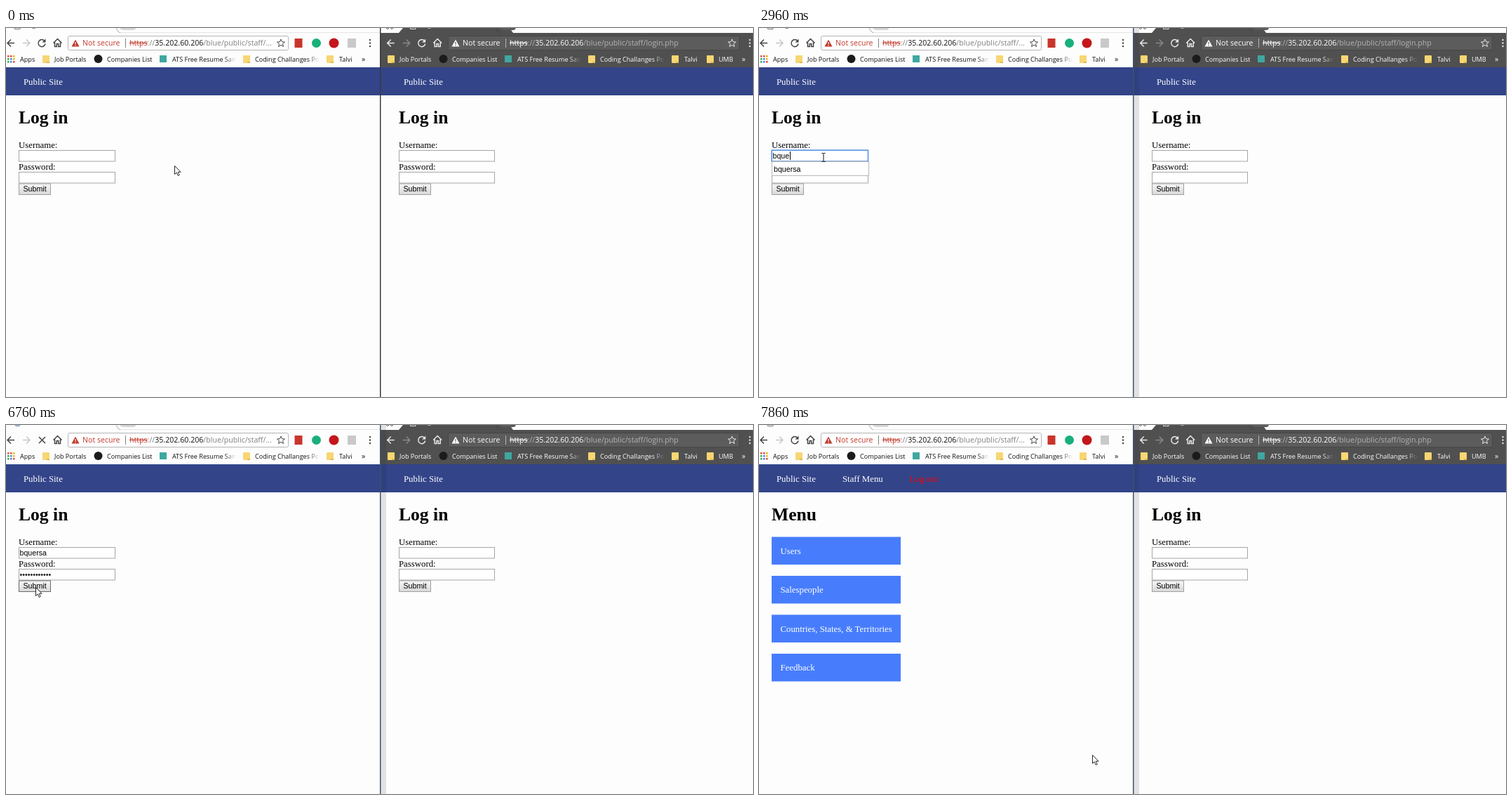
An HTML page for the animation above (8000 ms loop, 1065 px wide and 526 px high).

```html
<!DOCTYPE html>
<html lang="en">
<head>
<meta charset="utf-8">
<title>Log in</title>
<style>
html, body { margin: 0; width: 100%; height: 100%; overflow: hidden; background: #fdfdfd; }
svg { display: block; }
text { white-space: pre; }
.page { font: 12.8px "Liberation Serif", serif; }
.h1 { font: bold 25.6px "Liberation Serif", serif; }
.field { font: 10.67px "Liberation Sans", sans-serif; }
.mark { font: 9.1px "Open Sans", sans-serif; }
.url { font: 10.62px "Open Sans", sans-serif; }
.strike { text-decoration: line-through; }
.line { fill: none; stroke-width: 1.5; }
.thin { stroke-width: 1; }
</style>
</head>
<body>
<svg id="stage" width="1065" height="526" viewBox="0 0 1065 526"></svg>
<script>
const LOOP = 8000, USER = 'bquersa', BLUE = '#334489';
const light = {
  id: 'light', bar: '#fdfdfd', box: '#fff', edge: '#b4b4b4', ink: '#444', dim: '#c8c8c8',
  text: '#111', warn: '#c0392b', path: '#808080', tab: '#d6d6d6', slant: '#aaa'
};
const dark = {
  id: 'dark', bar: '#505050', box: '#5c5c5c', edge: '#464646', ink: '#e8e8e8', dim: '#888',
  text: '#fff', warn: '#fff', path: '#b4b4b4', tab: '#5a5a5a', slant: '#444'
};

const rect = (x, y, w, h, fill, more = '') =>
  `<rect x="${x}" y="${y}" width="${w}" height="${h}" fill="${fill}" ${more}/>`;
const text = (x, y, cls, s, fill = '#000', more = '') =>
  `<text x="${x}" y="${y}" class="${cls}" fill="${fill}" ${more}>${s}</text>`;
const dot = (x, y, r, fill) => `<circle cx="${x}" cy="${y}" r="${r}" fill="${fill}"/>`;
const line = (x, y, d, color, cls = '', more = '') =>
  `<path transform="translate(${x} ${y})" d="${d}" class="line ${cls}" stroke="${color}" ${more}/>`;
const group = (x, body) => `<g transform="translate(${x} 0)">${body}</g>`;

const folder = x => rect(x, 39, 10, 11, '#f7d673', 'rx="1"') + rect(x + 6, 48, 4, 2, '#e2b94a');
const fade = (x, c) => rect(x, 37, 20, 15, `url(#${c.id})`);

function bookmarks(c) {
  const label = (x, s) => text(x, 48, 'mark', s, c.text);
  return folder(52) + label(69, 'Job Portals')
    + dot(131.5, 44, 6, '#1b1b1b') + label(144, 'Companies List')
    + rect(219, 39, 10, 10, '#3fa7a0') + label(237, 'ATS Free Resume Sam') + fade(311, c)
    + folder(338) + label(355, 'Coding Challanges Po') + fade(430, c)
    + folder(457) + label(475, 'Talvi');
}

// Toolbar buttons and tab edge, placed relative to the window's left edge
function toolbar(c, reload) {
  return line(7, 21.5, 'M5 0H-5M0-5L-5 0 0 5', c.ink)
    + line(29, 21.5, 'M-5 0H5M0-5L5 0 0 5', c.dim)
    + `<g id="${reload}">` + line(51, 21.5, 'M4-3A5 5 0 1 0 5 1', c.ink)
    + `<path transform="translate(51 21.5)" d="M5.5-6V-1H.5Z" fill="${c.ink}"/></g>`
    + line(73.5, 21.5, 'M-6 0L0-6 6 0M-4-1V5H-1.2V1H1.2V5H4V-1', c.ink)
    + line(157, 0, 'M0 0L3 5Q4 6.5 6 6.5', c.slant, 'thin')
    + `<path d="M162 0H185Q185 3 181 3H167Q164 3 162 0Z" fill="${c.tab}"/>`;
}

function address(x, right, path, c) {
  return rect(x + .5, 11.5, right - x, 20, c.box, `stroke="${c.edge}" rx="2"`)
    + `<path d="M${x + 5.5} 26.5L${x + 11} 16.5 ${x + 16.5} 26.5Z" fill="${c.warn}"/>`
    + rect(x + 10.4, 20, 1.2, 3.2, c.box) + rect(x + 10.4, 24.2, 1.2, 1.2, c.box)
    + text(x + 21, 25, 'url', 'Not secure', c.warn)
    + rect(x + 82, 15, 1, 13, c.path)
    + text(x + 88, 25, 'url', `<tspan class="strike" fill="${c.warn}">https</tspan>`
      + `<tspan fill="${c.path}">://</tspan>35.202.60.206<tspan fill="${c.path}">${path}</tspan>`, c.text)
    + line(right - 10, 21.5, 'M0-5.5L1.6-1.8 5.5-1.5 2.5 1 3.5 5 0 2.8-3.5 5-2.5 1-5.5-1.5-1.6-1.8Z',
      c.ink, 'thin');
}

const menuDots = (x, c) => [17, 21.5, 26].map(y => dot(x, y, 1.2, c.ink)).join('');

function loginForm(button, width) {
  const input = y => rect(18.5, y + .5, width, 15.5, '#fff', 'stroke="#a6a6a6"');
  return text(18, 136, 'h1', 'Log in')
    + text(18, 171, 'page', 'Username:') + input(174)
    + text(18, 202, 'page', 'Password:') + input(205)
    + rect(18.5, 222, 45, 15.5, 'url(#button)', `id="${button}" stroke="#a0a0a0"`)
    + text(24.5, 233, 'field', 'Submit');
}

function menuPage() {
  const items = ['Users', 'Salespeople', 'Countries, States, &amp; Territories', 'Feedback'];
  return text(119, 81, 'page', 'Staff Menu', '#fff') + text(214.5, 81, 'page', 'Log out', '#f00')
    + text(18, 136, 'h1', 'Menu')
    + items.map((s, i) => rect(18, 159.5 + i * 55.5, 184, 39.5, '#477dfc')
      + text(30.5, 183.5 + i * 55.5, 'page', s, '#fff')).join('');
}

const appColors = ['#e04a3f', '#e04a3f', '#f0b400', '#35a853', '#4285f4', '#f0b400', '#35a853', '#4285f4', '#e04a3f'];
const apps = appColors.map((c, i) => rect(2 + i % 3 * 4, 39 + (i / 3 | 0) * 4, 2.5, 2.5, c)).join('');

const gradient = (id, attrs, color, opacity, end) => `<linearGradient id="${id}" ${attrs}>
  <stop stop-color="${color}" stop-opacity="${opacity}"/><stop offset=".85" stop-color="${end}"/></linearGradient>`;

const leftWindow = rect(0, 0, 533, 526, light.bar)
  + rect(163, 6, 370, 1, '#e4e4e4')
  + line(12.5, 0, 'M0-3V1.5H7.5V-3', '#777', 'thin', 'id="favicon"')
  + line(16.5, -2, 'M-4 1A4.5 4.5 0 0 0 4 1', '#7d96cc', '', 'id="spinner"')
  + text(27, -1, 'mark', 'Log in', '#333', 'id="title"')
  + toolbar(light, 'reload') + line(51.5, 21.5, 'M-4.5-4.5L4.5 4.5M4.5-4.5L-4.5 4.5', light.ink, '', 'id="stop"')
  + address(88, 402, '/blue/public/staff/...', light)
  + rect(411.5, 15, 11, 13, '#c8352c') + dot(442.5, 21.5, 6.5, '#18b07a') + dot(467.5, 21.5, 7, '#c4161c')
  + rect(487, 15, 12, 13, '#c9c9c9') + menuDots(519, light)
  + apps + text(20, 48, 'mark', 'Apps', light.text) + bookmarks(light) + text(507, 48, 'url', '»', light.text)
  + rect(0, 56, 533, 40, BLUE) + text(25, 81, 'page', 'Public Site', '#fff')
  + `<g id="login">${loginForm('submit', 137)}
    <rect id="ring" x="18.2" width="137.3" height="16" fill="none" stroke="#4f8de8" stroke-width="1.5"/>`
  + text(19.5, 186, 'field', '', '#000', 'id="user"') + text(19.5, 217, 'field', '•'.repeat(12), '#222', 'id="pass"')
  + rect(20, 0, 1, 12, '#000', 'id="caret"')
  + `<g id="popup">${rect(18.5, 190.5, 138, 20, '#fff', 'stroke="#b8b8b8"') + text(21, 204.5, 'field', USER)}</g></g>`
  + `<g id="menu">${menuPage()}</g>`;

// The strip beside the dark tab is white
const rightWindow = rect(534, 0, 531, 526, '#fdfdfd') + rect(534, 7, 531, 49, dark.bar)
  + `<path d="M566 0H718L723 7H560Z" fill="${dark.bar}"/>`
  + line(542, 0, 'M0 0Q2 3 4 0M6 0Q8 3 10 0', '#555', 'thin')
  + line(576.5, 0, 'M0-3V1.5H7.5V-3', '#ddd', 'thin')
  + text(591, -1, 'mark', 'Log in', '#eee')
  + group(541.7, toolbar(dark, 'reload2'))
  + address(630, 1045, '/blue/public/staff/login.php', dark) + menuDots(1060.5, dark)
  + group(492, bookmarks(dark)) + folder(999) + text(1016, 48, 'mark', 'UMB', '#fff')
  + text(1049, 48, 'url', '»', '#fff')
  + rect(534, 56, 531, 40, BLUE) + text(567, 81, 'page', 'Public Site', '#fff')
  + group(542, loginForm('submit2', 136));

document.getElementById('stage').innerHTML = '<defs>'
  + gradient('light', '', light.bar, 0, light.bar) + gradient('dark', '', dark.bar, 0, dark.bar)
  + gradient('button', 'x2="0" y2="1"', '#f7f7f7', 1, '#dcdcdc') + '</defs>'
  + leftWindow + rightWindow + rect(533, 0, 1.5, 526, '#3a3a3c', 'id="border"')
  + rect(534.5, 0, 7.5, 526, '#182038', 'id="shadow" opacity=".12"')
  + `<path id="arrow" d="M.5.5V12.5L3.2 10 5.2 14.5 7.2 13.6 5.2 9.3H9Z" fill="#fff" stroke="#111" stroke-width=".9"/>
     <path id="beam" d="M-2.5-6H-.6L0-5.4.6-6H2.5M0-5.4V5.4M-2.5 6H-.6L0 5.4.6 6H2.5" fill="none" stroke="#111"/>`;

const $ = id => document.getElementById(id);
const show = (id, on) => $(id).setAttribute('visibility', on ? 'inherit' : 'hidden');
const place = (id, [x, y]) => $(id).setAttribute('transform', `translate(${x} ${y})`);

// Number of the n evenly spaced steps from t0 to t1 already taken
const steps = (t, t0, t1, n) =>
  t < t0 ? 0 : Math.min(n, Math.floor((t - t0) * (n - 1) / (t1 - t0) + 1e-6) + 1);
const glide = (a, b, k) => a.map((v, i) => v + (b[i] - v) * k);

function pointer(t) {
  if (t < 1160) return glide([240, 196], [97, 143], steps(t, 450, 870, 4) / 4);
  if (t < 5020) return [92, 184.5];
  if (t < 5450) return glide([92, 185], [47, 225], steps(t, 5020, 5300, 3) / 3);
  return glide([42, 231], [475, 470], steps(t, 7350, 7860, 5) / 5);
}

function draw(t) {
  const within = (a, b) => t >= a && t < b;
  const loading = within(5600, 6920), done = t >= 6920, active = t >= 1300;
  const onUser = within(1300, 3630), onPass = within(3630, 5600), beam = within(1160, 5020);

  show('login', !done);
  show('menu', done);
  show('reload', !loading);
  show('stop', loading);
  show('favicon', !loading);
  show('spinner', loading);
  show('title', t < 5600);
  show('shadow', active);
  $('border').setAttribute('fill', active ? '#3c5468' : '#3a3a3c');
  $('submit').setAttribute('stroke', loading ? '#6a6a6a' : '#a0a0a0');

  const typed = Math.ceil(steps(t, 2560, 3350, 6) * USER.length / 6);
  $('user').textContent = USER.slice(0, typed);
  show('pass', t >= 4470);
  show('popup', within(2560, 3350));

  show('ring', onUser || onPass);
  $('ring').setAttribute('y', onPass ? 205.2 : 174.2);
  const field = onUser ? 'user' : 'pass';
  const filled = onUser || t >= 4470;
  $('caret').setAttribute('x', 20 + (filled ? Math.round($(field).getComputedTextLength()) : 0));
  $('caret').setAttribute('y', onUser ? 176 : 207);
  show('caret', within(1300, 2280) || within(2560, 4180) || within(4470, 5020));

  show('beam', beam);
  show('arrow', !beam);
  place(beam ? 'beam' : 'arrow', pointer(t));
}

const start = performance.now();
function tick() {
  draw((performance.now() - start) % LOOP);
  requestAnimationFrame(tick);
}
tick();
</script>
</body>
</html>
```
